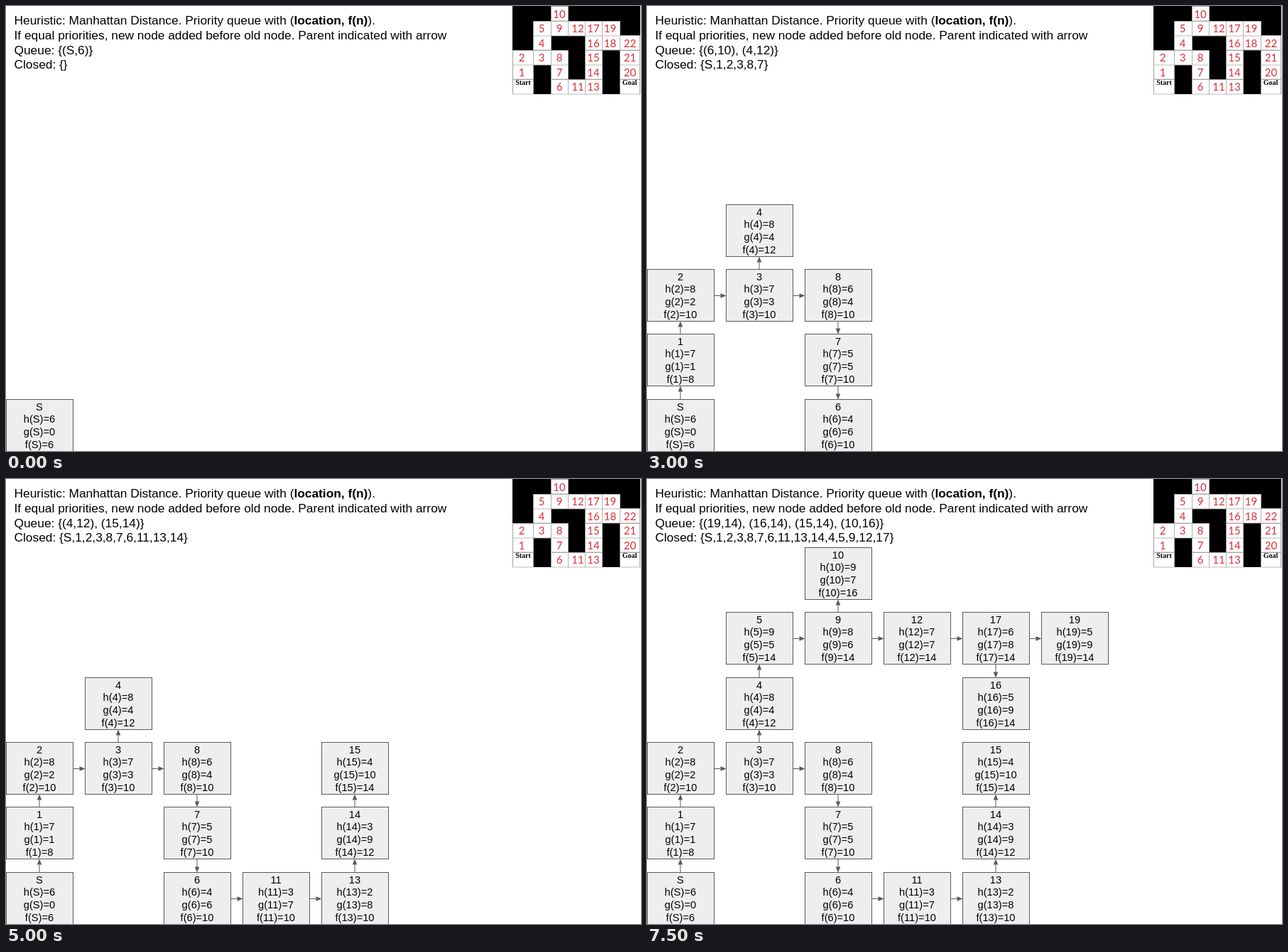
Animation, 894 px wide and 626 px high, one loop 8000 ms. Source, as an HTML page:

```html
<!DOCTYPE html>
<html lang="en">
<head>
<meta charset="utf-8">
<title>Best-first search through a maze</title>
<style>
  html, body { margin: 0; width: 100%; height: 100%; overflow: hidden; background: #fff; }
  svg { display: block; }
  text { white-space: pre; }
  .head { font: 17.33px "Liberation Sans", Arial, sans-serif; }
  .node { font: 14.67px "Liberation Sans", Arial, sans-serif; text-anchor: middle; }
  .cell { font: 15px Lato, sans-serif; fill: #dc2f36; text-anchor: middle; }
  .end { font: bold 10px "Liberation Serif", Times, serif; text-anchor: middle; }
</style>
</head>
<body>
<svg id="stage" width="894" height="626" viewBox="0 0 894 626">
  <g class="head">
    <text x="11.5" y="26">Heuristic: Manhattan Distance. Priority queue with (<tspan font-weight="bold">location, f(n)</tspan>).</text>
    <text x="11.5" y="46.8">If equal priorities, new node added before old node. Parent indicated with arrow</text>
    <text id="queue" x="11.5" y="67.6"></text>
    <text id="closed" x="11.5" y="88.4"></text>
  </g>
  <g id="maze"></g>
  <g id="tree"></g>
</svg>
<script>
const STEP_MS = 500, STEPS = 16;
const MAZE = [
  "# # 10 # # # #",
  "# 5 9 12 17 19 #",
  "# 4 # # 16 18 22",
  "2 3 8 # 15 # 21",
  "1 # 7 # 14 # 20",
  "S # 6 11 13 # G"
].map(line => line.split(" ")).reverse();
const MOVES = [[1, 0], [0, 1], [0, -1], [-1, 0]];
const GOAL = { col: 6, row: 0 };
const byId = id => document.getElementById(id);

function makeNode(col, row, parent, step) {
  const h = Math.abs(GOAL.col - col) + Math.abs(GOAL.row - row);
  const g = parent ? parent.g + 1 : 0;
  return { id: MAZE[row][col], col, row, parent, step, h, g, f: g + h };
}

// Runs the search and records the queue and closed list after each step.
function search() {
  const nodes = [makeNode(0, 0, null, 0)];
  const queue = [...nodes], closedIds = [], states = [];
  const record = () => states.push({
    queue: `Queue: {${queue.map(n => `(${n.id},${n.f})`).join(", ")}}`,
    closed: `Closed: {${closedIds.join(",")}}`
  });
  record();
  for (let step = 1; step < STEPS; step++) {
    const current = queue.shift();
    closedIds.push(current.id);
    const found = [];
    for (const [dx, dy] of MOVES) {
      const col = current.col + dx, row = current.row + dy;
      const id = MAZE[row]?.[col];
      if (!id || id === "#" || nodes.some(n => n.id === id)) continue;
      found.push(makeNode(col, row, current, step));
    }
    nodes.push(...found);
    queue.unshift(...found);
    queue.sort((a, b) => a.f - b.f);
    record();
  }
  return { nodes, states };
}

function drawMaze() {
  const edges = [713.5, 742.5, 767.5, 791.5, 815.5, 839.5, 864.5, 892.5];
  const centers = [726, 754, 779, 805, 827, 850.5, 878.5];
  let out = '<rect x="713" y="0" width="180" height="124"/>';
  MAZE.forEach((line, row) => line.forEach((id, col) => {
    if (id === "#") return;
    const y = Math.round((5 - row) * 20.6) + 0.5;
    out += `<rect x="${edges[col]}" y="${y}" width="${edges[col + 1] - edges[col]}" height="20.5" fill="#fff" stroke="#aaa" stroke-width=".8"/>`;
    if (id === "S") out += '<text class="end" x="728" y="111">Start</text>';
    else if (id === "G") out += '<text class="end" x="878" y="111">Goal</text>';
    else out += `<text class="cell" x="${centers[col]}" y="${16.7 + (5 - row) * 20.5}">${id}</text>`;
  }));
  byId("maze").innerHTML = out;
}

const BOX = { w: 94, h: 73 };
const boxX = n => 111 * n.col + 0.5;
const boxY = n => Math.floor(553.3 - 91.4 * n.row) + 0.5;

function arrow(from, to) {
  const dx = to.col - from.col, dy = from.row - to.row;
  const edge = (n, side) => [
    boxX(n) + (BOX.w + side * dx * BOX.w) / 2 - (dx ? 0 : 0.5),
    boxY(n) + (BOX.h + side * dy * BOX.h) / 2 + (dx ? 0.5 : 0)
  ];
  const [x1, y1] = edge(from, 1), [x2, y2] = edge(to, -1);
  const bx = x2 - dx * 8, by = y2 - dy * 8;
  return `<path d="M${x1} ${y1}L${bx} ${by}" stroke="#595959"/>` +
    `<path d="M${x2} ${y2}L${bx + dy * 3.3} ${by + dx * 3.3}L${bx - dy * 3.3} ${by - dx * 3.3}Z" fill="#595959"/>`;
}

function box(n) {
  const x = boxX(n), y = boxY(n);
  const lines = [n.id, ...["h", "g", "f"].map(k => `${k}(${n.id})=${n[k]}`)];
  return `<rect x="${x}" y="${y}" width="${BOX.w}" height="${BOX.h}" fill="#eee" stroke="#595959"/>` +
    lines.map((s, i) => `<text class="node" x="${x + 46.5}" y="${y + 15 + i * 17.7}">${s}</text>`).join("");
}

const { nodes, states } = search();
let shown = -1;

function render(time) {
  const step = Math.floor(time / STEP_MS) % STEPS;
  if (step === shown) return;
  shown = step;
  byId("queue").textContent = states[step].queue;
  byId("closed").textContent = states[step].closed;
  byId("tree").innerHTML = nodes.filter(n => n.step <= step)
    .map(n => box(n) + (n.parent ? arrow(n.parent, n) : "")).join("");
}

drawMaze();
const startTime = performance.now();
function tick() {
  render(performance.now() - startTime);
  requestAnimationFrame(tick);
}
tick();
</script>
</body>
</html>
```
